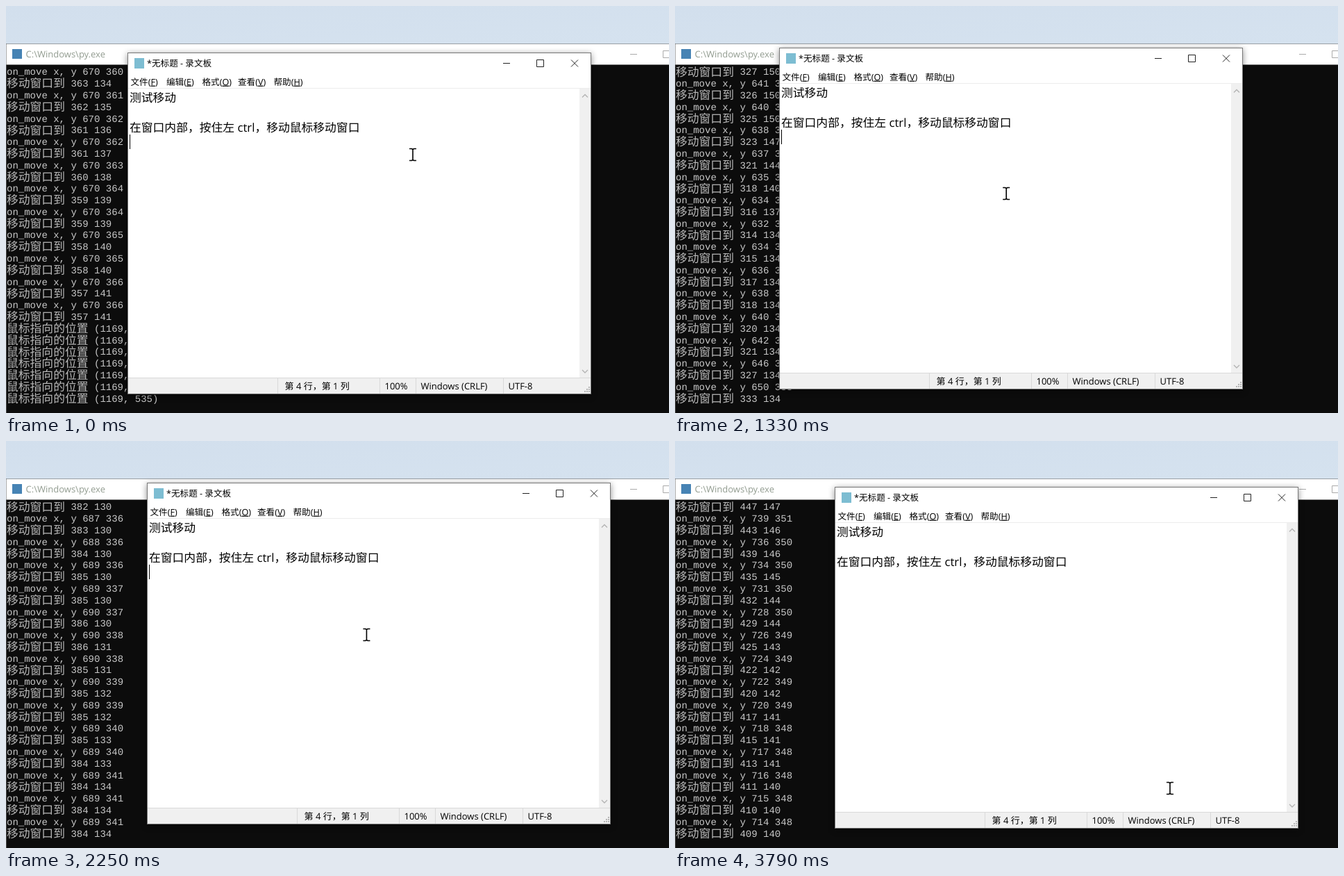
An HTML page that plays this animation: 955x586 px, repeating every 3870 ms.

```html
<!DOCTYPE html>
<html lang="zh-CN">
<head>
<meta charset="utf-8">
<title>移动窗口</title>
<style>
  html, body { margin: 0; width: 100%; height: 100%; overflow: hidden; }
  svg { display: block; width: 955px; height: 586px; }
  text { font: 12.6px "Open Sans", "Noto Sans CJK SC", sans-serif; text-rendering: geometricPrecision; white-space: pre; }
  #log text { font: 14px "Liberation Mono", monospace; fill: #c8c8c8; }
  #log .han { font: 300 16.8px "Noto Sans CJK SC", sans-serif; fill: #b8b8b8; }
  .page text { font-size: 16.8px; }
  .status text { font-size: 13px; }
  .u { text-decoration: underline; }
  .line { fill: none; stroke: #222; }
  .frame { filter: drop-shadow(0 2px 5px rgba(0, 0, 0, .45)); }
</style>
</head>
<body>
<svg viewBox="0 0 955 586">
  <defs>
    <linearGradient id="sky" x2="1" y2="1">
      <stop stop-color="#d2dfed"/><stop offset="1" stop-color="#d5e2ef"/>
    </linearGradient>
  </defs>
  <rect width="955" height="54" fill="url(#sky)"/>

  <rect y="54" width="955" height="31" fill="#fff"/>
  <path d="M0 54.5H955" stroke="#9a9fa4"/>
  <rect y="84.5" width="955" height="502" fill="#0c0c0c"/>
  <path d="M.5 54V586" stroke="#777" stroke-opacity=".6"/>
  <rect x="9" y="62" width="14" height="14" fill="#4683b4"/>
  <text x="28.5" y="74" style="font-size:13px" fill="#929c90">C:\Windows\py.exe</text>
  <path class="line" style="stroke:#aaa" d="M899 69.5h10M946.5 64.5h10v10h-10z"/>
  <g id="log"></g>

  <g id="pad">
    <rect class="frame" width="668" height="492" fill="#777"/>
    <rect x="1" y="1" width="666" height="490" fill="#fff"/>
    <rect x="10" y="8" width="14" height="15" fill="#7dbdd2"/>
    <text x="28" y="20.3">*无标题 - 录文板</text>
    <path class="line" d="M541 15.5h10M589.5 10.5h10v10h-10zM639 10.5l10 10M649 10.5l-10 10"/>
    <g id="menu"></g>
    <path d="M1 51.5H667" stroke="#ececec"/>
    <g class="page">
      <text x="3" y="70.9">测试移动</text>
      <text x="3" y="113.9">在窗口内部&#xFF0C;按住左 ctrl&#xFF0C;移动鼠标移动窗口</text>
    </g>
    <path id="caret" d="M3.5 118V139" stroke="#000"/>
    <rect x="651" y="52" width="16" height="416" fill="#f0f0f0"/>
    <path class="line" style="stroke:#b4b4b4;stroke-width:1.4" d="M655 64.5l4-4 4 4M655 457l4 4 4-4"/>
    <g class="status">
      <rect x="1" y="468" width="666" height="23" fill="#f0f0f0"/>
      <path d="M1 468.5H667M216.5 469V491M363.5 469V491M415.5 469V491M541.5 469V491" stroke="#d9d9d9"/>
      <text x="226.5" y="485.4">第 4 行&#xFF0C;第 1 列</text>
      <text x="370.5" y="485.4">100%</text>
      <text x="422.5" y="485.4">Windows (CRLF)</text>
      <text x="548.5" y="485.4">UTF-8</text>
      <path d="M658 488h2m1 0h2m1 0h2M661 485h2m1 0h2M664 482h2" stroke="#b5b5b5" stroke-width="2"/>
    </g>
  </g>

  <path id="mouse" class="line" style="stroke:#000;stroke-width:1.6" d="M-5-8.5h3.5l1.5 1 1.5-1h3.5M-5 8.5h3.5l1.5-1 1.5 1h3.5M0-8V8"/>
</svg>
<script>
const LOOP = 3870, ROWS = 29, PITCH = 16.79, SCALE = 1.05, LEAD = 0.6;
const FIRST_DRAG = 11, LAST_MOVE = 118, RELEASE = 3630, GLIDE = 160;
const $ = id => document.getElementById(id);
const clamp = u => Math.max(0, Math.min(1, u));
const mix = (a, b, u) => a.map((v, i) => v + (b[i] - v) * u);

// Turning points of the drag: move index, [mouse x, y, window x, y], ease-out power of the way there.
const turns = [
  [0, [670, 360, 363, 134]], [10, [670, 366, 357, 141], 1.5],
  [11, [665, 331, 351, 143]], [22, [655, 338, 341, 150], 3],
  [42, [640, 338, 325, 150]], [47, [632, 334, 314, 134]], [52, [642, 333, 321, 134]],
  [66, [672, 333, 367, 134], 2], [72, [683, 334, 378, 131]],
  [83, [690, 337, 386, 130]], [92, [689, 341, 384, 134], 1.5], [94, [700, 343, 400, 137]],
  [102, [764, 352, 465, 149], 1.5], [104, [742, 351, 447, 147]], [118, [714, 348, 409, 140], 1.5]
];

function move(n) {
  const i = Math.max(1, turns.findIndex(turn => n <= turn[0]));
  const [n0, from] = turns[i - 1], [n1, to, power = 1] = turns[i];
  return mix(from, to, 1 - (1 - clamp((n - n0) / (n1 - n0))) ** power);
}

// Bursts of screen updates: first and last time, count, logged moves at the first and last.
const steps = [
  [0, 0, 1, 10, 10], [280, 520, 4, 10, 18], [670, 980, 6, 21, 42], [1120, 1490, 5, 46, 61],
  [1670, 2000, 5, 66, 86], [2130, 2160, 2, 88, 89], [2250, 2250, 1, 92, 92], [2690, 2790, 2, 94, 98],
  [2960, 3070, 2, 102, 111], [3320, 3420, 2, 115, 118], [3710, 3790, 2, 118, 118]
].flatMap(([t0, t1, count, n0, n1]) => Array.from({ length: count }, (_, i) =>
  mix([t0, n0], [t1, n1], i / Math.max(1, count - 1)).map(Math.round)));

const lines = [], lineCount = [];
const logSpot = spot => lines.push(`鼠标指向的位置 (${spot})`);
for (let n = 0; n <= LAST_MOVE; n++) {
  if (n === FIRST_DRAG) logSpot('671, 331');
  const [x, y, left, top] = move(n).map(Math.round);
  lines.push(`on_move x, y ${x} ${y}`, `移动窗口到 ${left} ${top}`);
  if (n === FIRST_DRAG - 1) for (let i = 0; i < 7; i++) logSpot('1169, 535');
  lineCount[n] = lines.length;
}

function rowMarkup(line, i) {
  const [, han, rest] = line.match(/^([^ -~]*) ?(.*)$/);
  const x = han ? 9.4 + han.length * 16.8 : 1;
  const y = i * PITCH;
  return `<text class="han" x="1" y="${100.6 + y}">${han}</text><text x="${x}" y="${99.4 + y}">${rest}</text>`;
}

function pointer(t, n) {
  const [x, y] = move(Math.max(FIRST_DRAG, Math.min(LAST_MOVE, n + LEAD)));
  const held = [464.5 + (x - 640) * SCALE, 270 + (y - 333) * SCALE];
  return t < RELEASE
    ? mix([586, 214], held, clamp((t - 200) / GLIDE))
    : mix(held, [713, 500], clamp((t - RELEASE) / GLIDE));
}

const place = (id, [x, y]) => $(id).setAttribute('transform', `translate(${x} ${y})`);

function show([t, n]) {
  const [, , left, top] = move(n);
  $('log').innerHTML = lines.slice(lineCount[n] - ROWS, lineCount[n]).map(rowMarkup).join('');
  place('pad', [175 + (left - 357) * SCALE, 67 + (top - 141) * SCALE].map(Math.round));
  place('mouse', pointer(t, n));
  $('caret').style.display = (t + 100) % 1060 < 530 ? '' : 'none';
}

$('menu').innerHTML = ['文件F', '编辑E', '格式O', '查看V', '帮助H'].map((item, i) =>
  `<text x="${4.5 + i * 51.5}" y="46.6">${item.slice(0, 2)}(<tspan class="u">${item[2]}</tspan>)</text>`).join('');

let shown;
function tick() {
  const t = performance.now() % LOOP;
  const step = steps.findLast(s => s[0] <= t);
  if (step !== shown) show(shown = step);
  requestAnimationFrame(tick);
}
tick();
</script>
</body>
</html>
```
